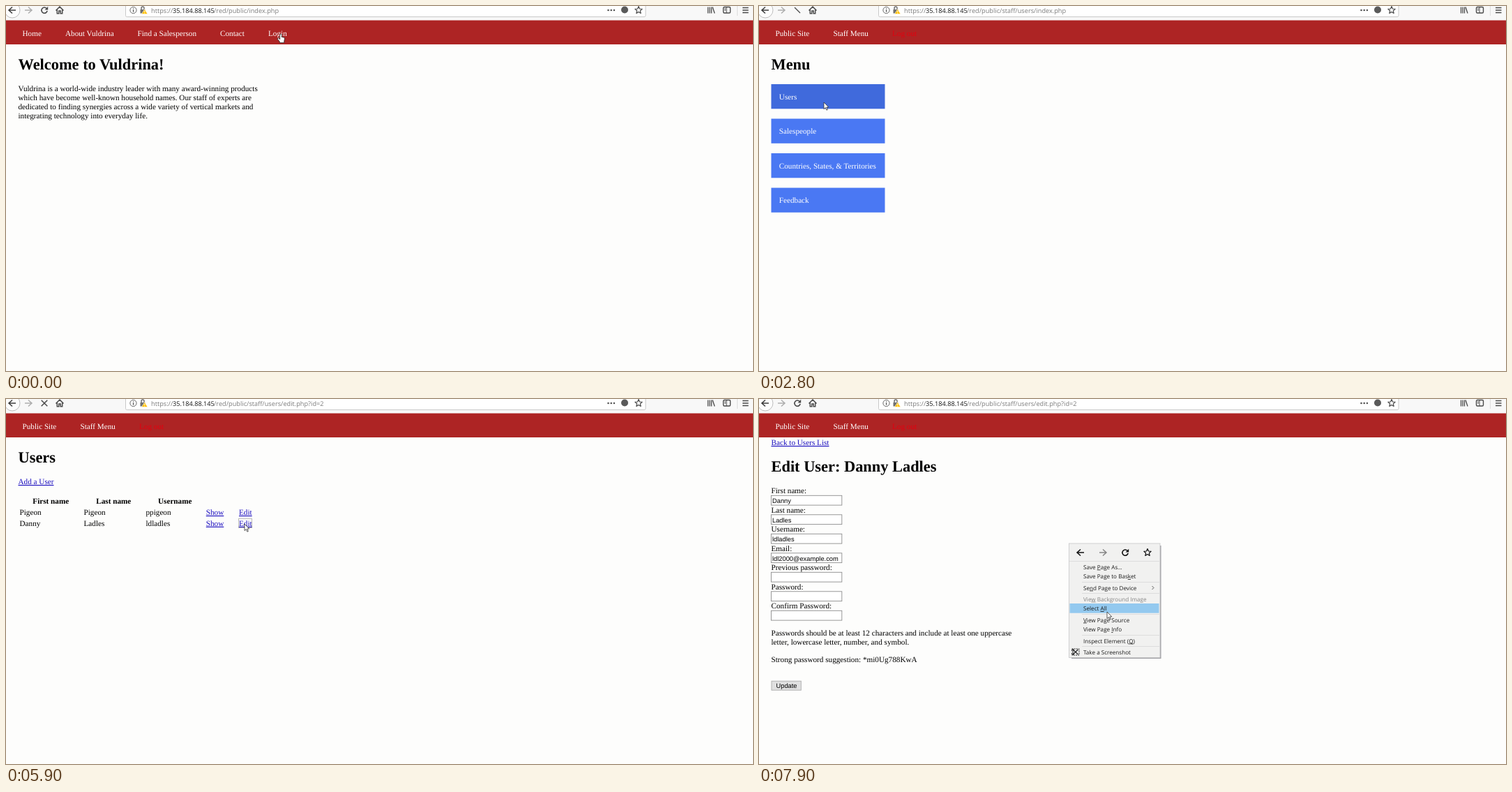
An HTML page that plays this animation: 1071x523 px, repeating every 8000 ms.

```html
<!DOCTYPE html>
<html lang="en">
<head>
<meta charset="utf-8">
<title>Staff site</title>
<style>
html, body { margin: 0; width: 100%; height: 100%; overflow: hidden; background: #fdfdfc; }
svg { display: block; position: absolute; left: 0; top: 0; }
text { font: 11.2px "Liberation Serif", "Times New Roman", serif; white-space: pre; text-rendering: geometricPrecision; }
.h1 { font-size: 22.4px; font-weight: bold; }
.th { font-weight: bold; }
.on { fill: #fff; }
.out { fill: #e4000f; }
.link { fill: #1a0dbf; text-decoration: underline; }
.field { font: 9.3px "Liberation Sans", Arial, sans-serif; }
.url { font: 9.2px "Open Sans", "Noto Sans", sans-serif; fill: #7c7c7c; }
.url .host { fill: #151515; }
.item { font: 8.15px "Open Sans", "Noto Sans", sans-serif; fill: #1c1c1c; }
.item.off { fill: #858585; }
.key { text-decoration: underline; }
.line { fill: none; stroke: #4a4a4a; stroke-width: 1.5; }
</style>
</head>
<body>
<svg id="stage" width="1071" height="523" viewBox="0 0 1071 523"></svg>
<script>
const LOOP = 8000, STEP = 100;

const text = (x, y, s, cls = '') => `<text x="${x}" y="${y}" class="${cls}">${s}</text>`;
const rect = (x, y, w, h, fill, more = '') =>
  `<rect x="${x}" y="${y}" width="${w}" height="${h}" fill="${fill}" ${more}/>`;
const line = (d, more = '') => `<path class="line" d="${d}" ${more}/>`;
const at = (x, y, s) => `<g transform="translate(${x} ${y})">${s}</g>`;
const group = (id, s) => `<g id="${id}">${s}</g>`;
const each = (list, fn) => list.map(fn).join('');

const arrow = (dir, color) =>
  line(`M${-5 * dir} 0H${5 * dir}M0 -4.5L${-5 * dir} 0L0 4.5`, `style="stroke:${color}"`);
const reload = color =>
  `<path d="M3 -2.7A4.1 4.1 0 1 0 4.1 .8" fill="none" stroke="${color}" stroke-width="1.6"/>` +
  `<path d="M5.2 -5.2V-.6H.6Z" fill="${color}"/>`;
const star = color => {
  const pts = Array.from({ length: 10 }, (_, i) => {
    const r = i % 2 ? 2.5 : 5.4, a = (i / 5 - 0.5) * Math.PI;
    return [r * Math.cos(a), r * Math.sin(a)].map(v => v.toFixed(2)).join();
  });
  return `<polygon points="${pts.join(' ')}" fill="none" stroke="${color}" stroke-width="1.2" stroke-linejoin="round"/>`;
};

function toolbar() {
  return rect(0, 0, 1071, 20.5, '#f8f8f8') +
    '<circle cx="9" cy="6" r="11" fill="#fdfdfd" stroke="#bdbdbd"/>' +
    at(9, 6, arrow(1, '#3c3c3c')) + at(32, 6, arrow(-1, '#adadad')) +
    at(55, 6,
      group('ready', reload('#474747')) +
      group('idle', reload('#b4b4b4')) +
      group('half', line('M-4 -4L4 4', 'style="stroke-width:1.2"')) +
      group('stop', line('M-4.3 -4.3L4.3 4.3M4.3 -4.3L-4.3 4.3'))) +
    at(77, 6, line('M-5.5 .5L0 -5L5.5 .5M-3.7 -.5V4.7H-1.2V1H1.2V4.7H3.7V-.5')) +
    rect(171.5, -6, 745.5, 21.5, '#fff', 'rx="2" stroke="#c9c9c9"') +
    '<circle cx="182.5" cy="6" r="4.6" fill="none" stroke="#686868"/>' +
    line('M182.5 5V8.7M182.5 3V4.1', 'style="stroke-width:1.1"') +
    rect(192.5, 5, 7, 5.5, '#707070') + line('M194 5V3A2 2 0 0 1 198 3V5', 'style="stroke:#707070"') +
    '<path d="M198.7 4.6L203 11.5H194.5Z" fill="#ffbf00" stroke="#fff" stroke-width=".6"/>' +
    line('M198.7 7V9.3M198.7 9.9V10.7', 'style="stroke:#fff;stroke-width:.9"') +
    text(208, 10, '<tspan>https://</tspan><tspan class="host" x="239">35.184.88.145</tspan><tspan id="path" x="298"></tspan>', 'url') +
    each([863.5, 867.7, 871.9], x => `<circle cx="${x}" cy="6" r="1.3" fill="#555"/>`) +
    '<circle cx="887" cy="5.5" r="5" fill="#5a5a5a"/>' +
    at(907, 6, star('#4a4a4a')) +
    line('M1006.5 1.5V10.5M1009 1.5V10.5M1011.5 1.5V10.5M1013 1.5L1016 10.5', 'style="stroke-width:1.3"') +
    rect(1028.5, 1.5, 10, 8.5, 'none', 'rx="1.5" stroke="#4a4a4a" stroke-width="1.4"') +
    line('M1033 2V10M1030 4H1032M1030 6H1032', 'style="stroke-width:1"') +
    line('M1048.5 0V14', 'style="stroke:#dedede;stroke-width:1"') +
    line('M1056 2.5H1064.5M1056 6H1064.5M1056 9.5H1064.5');
}

const NAV = rect(0, 20.5, 1071, 34.5, '#ad2424');
const STAFF = text(23.5, 43, 'Public Site', 'on') + text(106.5, 43, 'Staff Menu', 'on') + text(191, 43, 'Log out', 'out');

function home() {
  const links = [[23.5, 'Home'], [85, 'About Vuldrina'], [188.5, 'Find a Salesperson'], [307, 'Contact'], [376, 'Login']];
  const copy = [
    'Vuldrina is a world-wide industry leader with many award-winning products',
    'which have become well-known household names. Our staff of experts are',
    'dedicated to finding synergies across a wide variety of vertical markets and',
    'integrating technology into everyday life.'];
  return each(links, ([x, s]) => text(x, 43, s, 'on')) +
    text(17.5, 91, 'Welcome to Vuldrina!', 'h1') +
    each(copy, (s, i) => text(17.5, 122 + i * 13, s));
}

function staffMenu() {
  const names = ['Users', 'Salespeople', 'Countries, States, &amp; Territories', 'Feedback'];
  return STAFF + text(17.5, 91, 'Menu', 'h1') + each(names, (s, i) => {
    const y = 112 + i * 49.5;
    return rect(17.5, y, 163, 35.3, '#4a78f3', `id="btn${i}"`) + text(28.8, y + 21.5, s, 'on');
  });
}

function userList() {
  const rows = [['Pigeon', 'Pigeon', 'ppigeon'], ['Danny', 'Ladles', 'ldladles']];
  const cols = [19.5, 111.5, 200.5];
  return STAFF + text(17.5, 91, 'Users', 'h1') + text(17.5, 122, 'Add a User', 'link') +
    text(38.3, 150, 'First name', 'th') + text(129.3, 150, 'Last name', 'th') + text(218, 150, 'Username', 'th') +
    each(rows, (row, i) => {
      const y = 166 + i * 15.8;
      return each(row, (s, c) => text(cols[c], y, s)) + text(286.8, y, 'Show', 'link') + text(334, y, 'Edit', 'link');
    }) +
    rect(333.5, 171.5, 19, 13, 'none', 'id="focus" stroke="#555" stroke-width=".8" stroke-dasharray="1 1"');
}

function editUser() {
  const fields = [['First name:', 'Danny'], ['Last name:', 'Ladles'], ['Username:', 'ldladles'],
    ['Email:', 'ldl2000@example.com'], ['Previous password:', ''], ['Password:', ''], ['Confirm Password:', '']];
  return STAFF + text(17.5, 66, 'Back to Users List', 'link') +
    text(17.5, 104, 'Edit User: Danny Ladles', 'h1') +
    each(fields, ([label, value], i) => {
      const y = 135 + i * 27.5;
      return text(17.5, y, label) + rect(17.5, y + 3.3, 101.3, 13.8, '#fff', 'stroke="#8d8d8d" stroke-width=".9"') +
        text(19, y + 14, value, 'field');
    }) +
    text(17.5, 339, 'Passwords should be at least 12 characters and include at least one uppercase') +
    text(17.5, 352, 'letter, lowercase letter, number, and symbol.') +
    text(17.5, 376.5, 'Strong password suggestion: *mi0Ug788KwA') +
    rect(18, 404.2, 42.3, 13, '#e0e0e0', 'stroke="#acacac" stroke-width=".9"') + text(24.5, 414.3, 'Update', 'field');
}

const ITEMS = [[240.5, 'Save _Page As...'], [254, 'Save Page to Bas_ket'], [270.5, 'Se_nd Page to Device'],
  [286.5, 'Vie_w Background Image', 'off'], [300, 'Select _All'], [316.5, '_View Page Source'],
  [330, 'View Page _Info'], [346.5, 'Inspect Element (_Q)'], [362.5, 'Take a Screenshot']];

function popup() {
  const mark = s => s.replace(/_(.)/, '<tspan class="key">$1</tspan>');
  return rect(444.5, 207, 130.5, 163.5, '#f1f1f0', 'stroke="#c6c6c6" stroke-width=".8"') +
    at(461, 220, arrow(1, '#111')) + at(493, 220, arrow(-1, '#858585')) +
    at(525, 220, reload('#111')) + at(557, 220, star('#111')) +
    rect(445.5, 293, 128, 13.7, '#93c9ef', 'id="pick"') +
    each([232.5, 262.5, 278.5, 308.5, 338.5, 354.5], (y, i) =>
      line(`M${i ? 463 : 445} ${y}H574`, 'style="stroke:#d8d8d8;stroke-width:.8"')) +
    each(ITEMS, ([y, s, off]) => text(465, y + 3, mark(s), 'item ' + (off || ''))) +
    line('M563.5 268L566 270.5L563.5 273', 'style="stroke-width:.9"') +
    at(453.5, 362.5, line('M-4 -4L4 3.5M-4 4L4 -3.5', 'style="stroke:#222;stroke-width:1.2"') +
      line('M-5 -4.5H5.5V4.5H-5', 'style="stroke:#222;stroke-width:1;stroke-dasharray:2 1.2"') +
      each([-2.5, 2.5], y => `<circle cx="-3.5" cy="${y}" r="1.5" fill="none" stroke="#222"/>`));
}

const CURSOR = group('cursor',
  '<path id="point" d="M0 0V9.6L2.3 7.6L3.9 11.2L5.4 10.5L3.8 7H6.8Z" fill="#fff" stroke="#333" stroke-width=".8"/>' +
  '<path id="hand" d="M-1.3 .8Q0 -.6 1.2 .8V4.3L4.8 5.2Q5.8 5.6 5.6 7L4.8 10.2V12.7H-1.7V11L-4.6 7.5Q-5 5.8 -3.4 6L-1.3 7.7Z" fill="#fff" stroke="#222" stroke-width=".8"/>');

const stage = document.getElementById('stage');
const pages = { home: home(), menu: staffMenu(), list: userList(), edit: editUser() };
stage.innerHTML = toolbar() + NAV +
  Object.entries(pages).map(([id, s]) => group(id, s)).join('') +
  group('shadow', line('M575.6 210V371.2H448', 'style="stroke:#9d9da2;stroke-width:1.8"')) +
  group('popup', popup()) + CURSOR;

const el = id => document.getElementById(id);
const show = (id, on) => { el(id).style.display = on ? '' : 'none'; };

// Each track lists [start time, value]
const PAGE = [[0, 'home'], [1100, 'menu'], [3000, 'list'], [6000, 'edit']];
const PATH = [[0, 'index.php'], [700, 'staff/index.php'], [2700, 'staff/users/index.php'], [5700, 'staff/users/edit.php?id=2']];
const LOAD = [[0, 'ready'], [700, 'half'], [800, 'stop'], [1100, 'idle'], [1700, 'ready'],
  [2700, 'half'], [2900, 'stop'], [3000, 'idle'], [3600, 'ready'],
  [5700, 'half'], [5800, 'stop'], [6000, 'idle'], [6600, 'ready']];
const HAND = [[0, true], [700, false], [2200, true], [2700, false], [4800, true], [5700, false]];
const MOVES = [[0, 394, 40], [1000, 394, 40], [1500, 119, 148.5], [1800, 119, 148.5], [2300, 93, 138],
  [3100, 93, 138], [3700, 258, 155], [4000, 262, 158], [4900, 342, 179], [6200, 342, 179],
  [6900, 444, 206], [7400, 444, 206], [7900, 499, 305]];

const value = (track, t) => track.filter(k => k[0] <= t).pop()[1];

function position(t) {
  let i = 1;
  while (i < MOVES.length - 1 && MOVES[i][0] < t) i++;
  const [t0, x0, y0] = MOVES[i - 1], [t1, x1, y1] = MOVES[i];
  const p = Math.min(1, (t - t0) / (t1 - t0)), e = p * p * (3 - 2 * p);
  return [x0 + (x1 - x0) * e, y0 + (y1 - y0) * e];
}

function draw(t) {
  const [x, y] = position(t), page = value(PAGE, t), load = value(LOAD, t), hand = value(HAND, t);
  for (const id in pages) show(id, id === page);
  for (const id of ['ready', 'idle', 'half', 'stop']) show(id, id === load);
  el('path').textContent = '/red/public/' + value(PATH, t);
  el('btn0').setAttribute('fill', x < 180 && y > 112 && y < 147 ? '#406adc' : '#4a78f3');
  show('focus', t >= 5600);
  show('shadow', t >= 7300);
  show('popup', t >= 7400);
  const item = ITEMS.find(([c]) => Math.abs(y - c) < 7);
  show('pick', item);
  if (item) el('pick').setAttribute('y', item[0] - 7);
  show('hand', hand);
  show('point', !hand);
  el('cursor').setAttribute('transform', `translate(${x} ${y})`);
}

const start = performance.now();
function tick(now) {
  const t = Math.max(0, now - start) % LOOP;
  draw(Math.floor(t / STEP) * STEP);
  requestAnimationFrame(tick);
}
draw(0);
requestAnimationFrame(tick);
</script>
</body>
</html>
```
